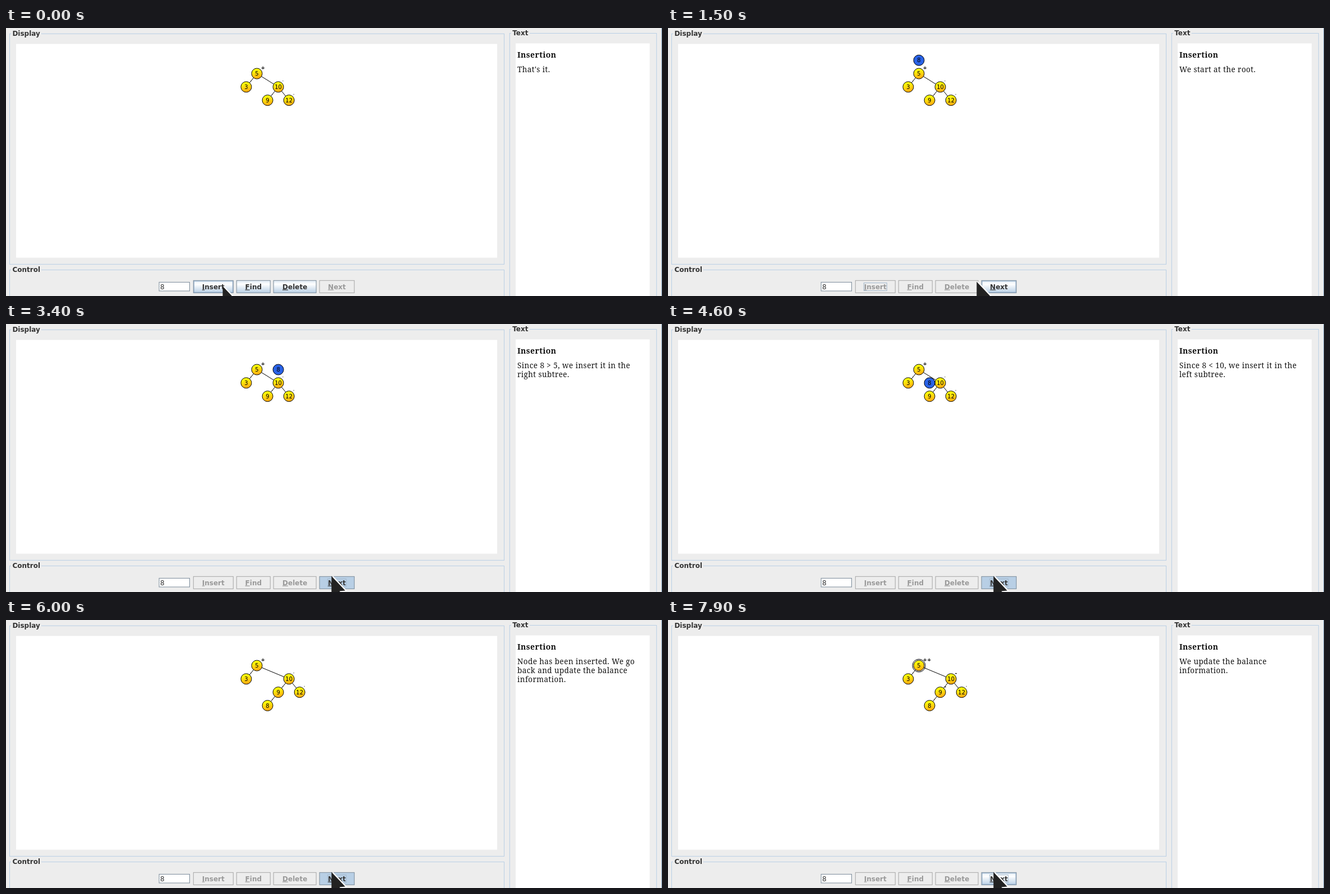
These frames come from a looping animation (1170x479 px, 8000 ms). An HTML page:

```html
<!DOCTYPE html>
<html lang="en">
<head>
<meta charset="utf-8">
<title>Tree insertion</title>
<style>
html, body { margin: 0; width: 100%; height: 100%; overflow: hidden; background: #ededed; }
svg { display: block; }
text { font: 12px "DejaVu Sans", sans-serif; white-space: pre; }
.bold { font-weight: bold; fill: #333; }
.key { text-decoration: underline; }
.prose { font: 13.5px "Noto Serif", serif; letter-spacing: .44px; fill: #111; }
.head { font-size: 14px; font-weight: bold; }
.num { font-size: 10px; text-anchor: middle; }
.sign { font-size: 9px; font-weight: bold; }
.dot { font-weight: normal; }
</style>
</head>
<body>
<svg width="1170" height="479" viewBox="0 0 1170 479">
  <defs>
    <linearGradient id="gold" x2=".25" y2="1">
      <stop offset=".2" stop-color="#ffff0a"/><stop offset=".55" stop-color="#ffdc0c"/><stop offset="1" stop-color="#ffae10"/>
    </linearGradient>
    <linearGradient id="steel" x2="0" y2="1">
      <stop offset="0" stop-color="#dde8f3"/><stop offset=".3" stop-color="#fff"/><stop offset="1" stop-color="#b8cfe5"/>
    </linearGradient>
    <clipPath id="view"><path d="M18 29H876V410H18z"/></clipPath>
  </defs>
  <g id="panels"></g>
  <g id="scene"></g>
</svg>
<script>
const LOOP = 8000, TICK = 100;
const STEPS = 10, STEP_MS = 40;
const SCALE = .953, ROOT = [447.5, 81.5];
const $ = id => document.getElementById(id);

const rect = (x, y, w, h, fill, stroke = 'none') =>
  `<rect x="${x}" y="${y}" width="${w}" height="${h}" fill="${fill}" stroke="${stroke}"/>`;
const label = (x, y, s, cls = '', attrs = '') =>
  `<text x="${x}" y="${y}" class="${cls}" ${attrs}>${s}</text>`;
const within = (t, spans) => spans.some(([a, b]) => t >= a && t < b);

// Titled group boxes, white areas and the input field
const group = (x, y, w, h, title, tw) =>
  rect(x, y, w, h, 'none', '#b8cfe5') + rect(x + 2.5, y - 1, tw, 2, '#ededed') +
  label(x + 4.9, y + 3.8, title, 'bold');

$('panels').innerHTML =
  group(6.5, 10.3, 882, 412, 'Display', 54) +
  group(6.5, 432.3, 882, 80, 'Control', 54) +
  group(898.3, 9.5, 262, 500, 'Text', 33) +
  rect(18, 28.5, 858, 382, '#fff') + rect(909, 27.5, 239, 460, '#fff') +
  rect(1169, 0, 1, 479, '#7f9db9') +
  rect(273.1, 454.4, 54.4, 15.6, '#fff', '#7a8a99') + label(275, 466.8, '8', '', 'fill="#333"');

// Integer steps towards the goal, so the remainder is caught up late
function walk(from, to, begin, t) {
  const done = Math.max(0, Math.min(STEPS, Math.floor((t - begin) / STEP_MS)));
  return from.map((v, i) => {
    for (let left = STEPS; left > STEPS - done; left--) v += Math.trunc((to[i] - v) / left);
    return v;
  });
}

const route = [[-457, -55], [0, -25], [40, 0], [20, 25], [20, 75]];
const departures = [660, 2340, 3540, 4760];

function newNode(t) {
  const leg = departures.findLastIndex(d => t >= d);
  return walk(route[leg], route[leg + 1], departures[leg], t);
}

function circle([x, y], value, fill, ringed) {
  return `<g stroke="#000"><circle cx="${x}" cy="${y}" r="9.5" fill="${fill}"/>` +
    (ringed ? `<circle cx="${x}" cy="${y}" r="11.5" fill="none"/>` : '') + '</g>' +
    label(x, y + 3.6, value, 'num');
}

function tree(t) {
  const place = ([x, y]) => [ROOT[0] + x * SCALE, ROOT[1] + y * SCALE];
  const grow = (x, y) => place(walk([x, y], [x + 20, y], 4760, t));
  const linked = t >= 4800;
  const at = { 5: ROOT, 3: place([-20, 25]), 10: grow(40, 25), 9: grow(20, 50), 12: grow(60, 50) };
  const sign = { 5: t < 7900 ? '+' : '++', 3: '·', 10: t < 7100 ? '·' : '-', 9: t < 6100 ? '·' : '-', 12: '·' };
  const edges = [[5, 3], [5, 10], [10, 9], [10, 12]];
  if (t >= 700) at[8] = place(newNode(t));
  if (linked) { edges.push([9, 8]); sign[8] = '·'; }
  const ring = t < 6100 ? 0 : t < 7100 ? 9 : t < 7900 ? 10 : 5;

  const lines = edges.map(([a, b]) => `M${at[a]}L${at[b]}`).join('');
  const nodes = [5, 3, 10, 9, 12, 8].filter(n => at[n]).map(n =>
    circle(at[n], n, n === 8 && !linked ? '#2962e6' : 'url(#gold)', n === ring));
  const signs = Object.keys(sign).map(n =>
    label(at[n][0] + 7, at[n][1] - 7.5, sign[n], sign[n] === '·' ? 'sign dot' : 'sign'));
  return `<g clip-path="url(#view)"><path d="${lines}" stroke="#000" fill="none"/>` +
    nodes.join('') + signs.join('') + '</g>';
}

const story = [
  [0, "That's it."],
  [700, 'We start at the root.'],
  [2300, 'Since 8 &gt; 5, we insert it in the', 'right subtree.'],
  [3500, 'Since 8 &lt; 10, we insert it in the', 'left subtree.'],
  [4800, 'Node has been inserted. We go', 'back and update the balance', 'information.'],
  [6100],
  [6200, 'We update the balance', 'information.']
];

function prose(t) {
  const [, ...lines] = story.findLast(s => t >= s[0]);
  if (!lines.length) return '';
  return label(912, 53.4, 'Insertion', 'prose head') +
    lines.map((s, i) => label(912, 79.3 + 16 * i, s, 'prose')).join('');
}

function button(x, w, name, tw, { on, hover, down, focus }) {
  const mid = x + w / 2;
  return rect(x, 451.3, w, 22, !on ? '#ededed' : down ? '#b8cfe5' : 'url(#steel)', on ? '#7a8a99' : '#a6a6a6') +
    (on && hover && !down ? rect(x + 1, 452.3, w - 2, 20, 'none', '#8fabc8') : '') +
    (focus ? rect(mid - tw / 2 - .5, 455.5, tw + 1, 14, 'none', '#a3b8cc') : '') +
    label(mid, 466.5, `<tspan class="key">${name[0]}</tspan>${name.slice(1)}`, 'bold',
      `text-anchor="middle" style="fill:${on ? '#333' : '#999'}"`);
}

function buttons(t) {
  const idle = t < 700;
  const presses = [[2100, 2300], [3400, 3500], [4600, 4800], [6000, 6100], [6900, 7100], [7800, 7900]];
  return button(334.3, 71, 'Insert', 40, { on: idle, hover: true, down: t >= 500, focus: t >= 500 && t < 2100 }) +
    button(411.3, 60, 'Find', 30, { on: idle }) +
    button(477.2, 76, 'Delete', 46, { on: idle }) +
    button(559.2, 62, 'Next', 32, { on: !idle, hover: t >= 1500, down: within(t, presses), focus: t >= 2100 });
}

const stops = [[0, 386, 461], [1300, 489, 455], [1500, 550, 453], [1600, 571, 451], [1700, 580, 450]];

// Dark arrow with a white rim that is widest along its right side
function pointer(t) {
  const [, x, y] = stops.findLast(s => t >= s[0]);
  const arrow = 'M.5 .5V36L8 29L14 42L20 39L15 27.5L25 26.5z';
  return `<g transform="translate(${x} ${y})"><path transform="translate(2.5)" d="${arrow}" fill="#fff"
    stroke="#fff"/><path d="${arrow}" fill="#222"/></g>`;
}

let shown = -1;
function frame(now) {
  const t = Math.floor(now % LOOP / TICK) * TICK;
  if (t !== shown) {
    shown = t;
    $('scene').innerHTML = tree(t) + prose(t) + buttons(t) + pointer(t);
  }
  requestAnimationFrame(frame);
}
frame(performance.now());
</script>
</body>
</html>
```
